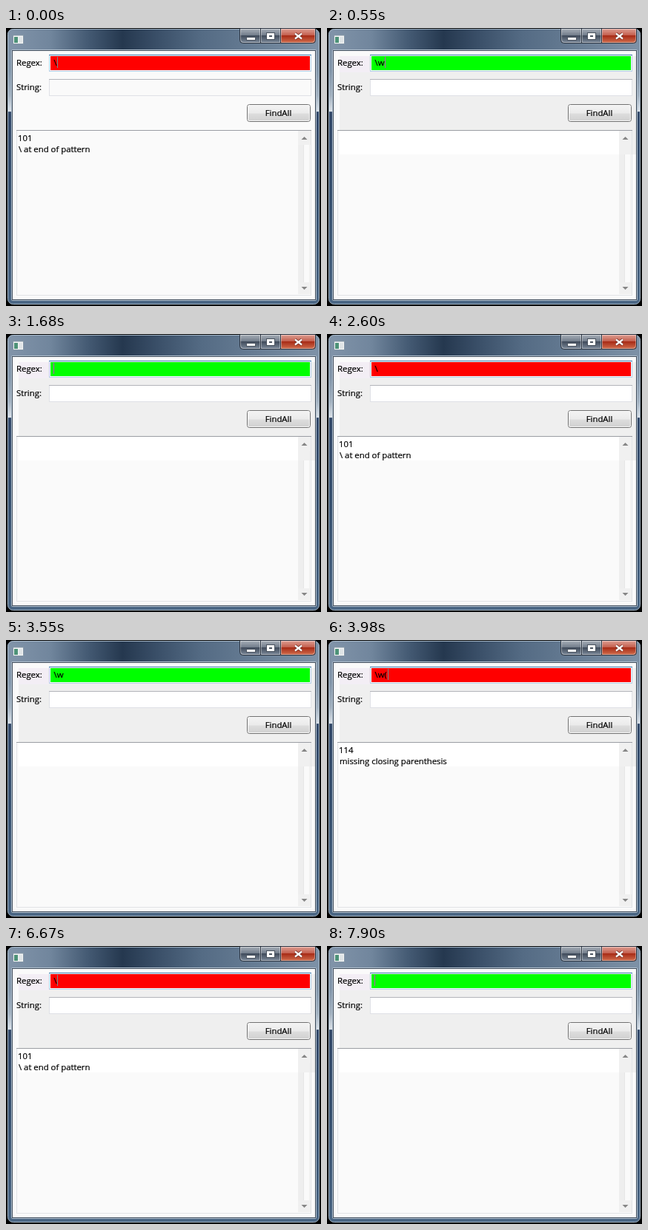
Write an HTML page with a canvas that moves like this. It is 425 px wide and 376 px high and loops after 8000 ms.

```html
<!DOCTYPE html>
<html lang="en">
<head>
<meta charset="utf-8">
<title>Regex tester</title>
<style>
html, body { margin: 0; width: 100%; height: 100%; overflow: hidden; background: #000; }
canvas, svg { position: absolute; left: 0; top: 0; width: 425px; height: 376px; }
text { font: 11.35px "Open Sans", "Noto Sans", sans-serif; fill: #000; stroke: #000; stroke-width: .22px; }
</style>
</head>
<body>
<canvas id="view" width="425" height="376"></canvas>
<svg viewBox="0 0 425 376">
  <text x="14" y="51">Regex:</text>
  <text x="14" y="84">String:</text>
  <text x="367.5" y="119" text-anchor="middle">FindAll</text>
  <text id="pattern" x="64.6" y="51"></text>
  <text id="code" x="16" y="153"></text>
  <text id="message" x="17" y="168"></text>
</svg>
<script>
const LOOP = 8000;
const ctx = document.getElementById('view').getContext('2d');
const [pattern, code, message] = ['pattern', 'code', 'message'].map(id => document.getElementById(id));

// start time, typed pattern, caret visible
const steps = [
  [0, '\\', 1], [430, '\\w', 0], [550, '\\w', 1], [1100, '\\w', 0],
  [1410, '\\', 1], [1680, '', 1], [2080, '\\', 1], [2600, '\\', 0],
  [3030, '\\w', 1], [3550, '\\w', 0], [3980, '\\w(', 1], [4410, '\\w(', 0],
  [4970, '\\w(', 1], [5560, '\\w(', 0], [5990, '\\w', 1], [6510, '\\w', 0],
  [6670, '\\', 1], [6790, '', 1], [7340, '', 0], [7900, '', 1]
];
const caretX = [64, 69, 78, 82];
const errors = {
  '\\': ['101', '\\ at end of pattern'],
  '\\w(': ['114', 'missing closing parenthesis']
};

function rect(x, y, w, h, fill) {
  ctx.fillStyle = fill;
  ctx.fillRect(x, y, w, h);
}

function addStops(gradient, stops) {
  stops.forEach(([at, color]) => gradient.addColorStop(at, color));
  return gradient;
}
const down = (y0, y1, ...stops) => addStops(ctx.createLinearGradient(0, y0, 0, y1), stops);
const across = (x0, x1, ...stops) => addStops(ctx.createLinearGradient(x0, 0, x1, 0), stops);

function rounded(x, y, w, h, r, fill, stroke) {
  ctx.beginPath();
  ctx.roundRect(x, y, w, h, r);
  if (fill) { ctx.fillStyle = fill; ctx.fill(); }
  if (stroke) { ctx.strokeStyle = stroke; ctx.lineWidth = 1; ctx.stroke(); }
}

function box(x, y, w, h, fill, top, side) {
  rect(x, y, w, h, side);
  rect(x + 1, y + 1, w - 2, h - 2, fill);
  rect(x, y, w, 1, top);
}

function arrow(x, y, dir) {
  ctx.fillStyle = '#858585';
  ctx.beginPath();
  ctx.moveTo(x - 4, y + 2 * dir);
  ctx.lineTo(x + 4, y + 2 * dir);
  ctx.lineTo(x, y - 2 * dir);
  ctx.fill();
}

function captionButton(x, w, radii, fill) {
  rounded(x + 0.5, 0.5, w, 20, radii, fill, '#2b3441');
  rounded(x + 1.5, 1.5, w - 2, 18, radii, null, 'rgba(255,255,255,.4)');
}

function drawCaption() {
  const steel = down(1, 20, [0, '#a9b0b9'], [0.45, '#737e8c'], [0.5, '#414c5c'], [1, '#7b8898']);
  const red = down(1, 20, [0, '#dfa094'], [0.45, '#c4604f'], [0.5, '#a82c17'], [1, '#cf6c4c']);
  captionButton(315, 28, [0, 0, 0, 4], steel);
  captionButton(343, 27, 0, steel);
  captionButton(370, 47, [0, 0, 4, 0], red);

  rect(324, 12, 13, 5, '#4c5561');
  rect(325, 13, 11, 3, '#fff');
  rect(351, 6, 12, 10, '#4c5561');
  rect(352, 7, 10, 8, '#fff');
  rect(355, 10, 4, 2, '#4c5561');

  for (const [color, width] of [['#6b2a22', 4], ['#fff', 2.3]]) {
    ctx.strokeStyle = color;
    ctx.lineWidth = width;
    ctx.beginPath();
    ctx.moveTo(390, 7.5); ctx.lineTo(399, 14.5);
    ctx.moveTo(399, 7.5); ctx.lineTo(390, 14.5);
    ctx.stroke();
  }

  rect(9, 9, 15, 13, '#8496a6');
  rect(10, 10, 13, 11, '#f4f6f6');
  rect(10, 10, 13, 1, '#c2cbd2');
  rect(11, 12, 5, 8, '#4d9278');
  rect(17, 12, 5, 8, '#dfe4e6');
}

function drawFrame() {
  rect(0, 0, 425, 376, '#000');
  rounded(2.5, 1.5, 420, 372, 7,
    down(2, 374, [0, '#7d90a5'], [0.15, '#8397ab'], [0.24, '#a3b2c1'],
      [0.298, '#dbe2e9'], [0.3, '#33496a'], [0.6, '#36506f'], [1, '#4a6684']));
  ctx.save();
  ctx.clip();
  rect(0, 0, 425, 30, across(0, 425, [0, '#8295aa'], [0.14, '#71869d'], [0.26, '#445a73'],
    [0.37, '#25384f'], [0.48, '#3a4f68'], [0.62, '#546b84'], [1, '#7f93a8']));
  ctx.restore();
  rounded(2.5, 1.5, 420, 372, 7, null, '#a9bac9');
  rounded(7.5, 29.5, 411, 339, 1, null, '#b4c3d1');
  rect(8, 30, 410, 338, '#3f4c5b');
  drawCaption();
}

function drawForm(first, color) {
  rect(9, 31, 408, 336, '#fafafa');
  if (!first) {
    rect(17, 38, 400, 133, '#efefef');
    rect(17, 38, 41, 22, '#f3eef5');
  }
  const paper = first ? '#fafafa' : '#fff';

  box(58, 36, 354, 23, '#f7fbfd', '#3d7bad', '#b5cfe7');
  rect(60, 38, 350, 19, color);
  box(58, 69, 354, 23, paper, '#b2b4ba', '#dfe1e6');

  rounded(325.5, 103.5, 85, 23, 3,
    down(104, 127, [0, '#f3f3f3'], [0.48, '#ebebeb'], [0.52, '#dddddd'], [1, '#cfcfcf']), '#707070');
  rounded(326.5, 104.5, 83, 21, 2, null, '#f8f8f8');

  box(14, 138, 398, 224, '#fafafa', '#9a9da3', '#e1e3e6');
  if (!first) rect(17, 139, 377, 32, '#fff');
  rect(394, 139, 8, 221, '#eeeeee');
  rect(401, 158, 1, 186, '#e6e6e6');
  rect(394, 139, 17, first ? 19 : 32, '#f0f0f0');
  rect(394, 344, 17, 16, '#f0f0f0');
  rect(409, 158, 1, 186, '#ededed');
  arrow(402.5, 149, 1);
  arrow(402.5, 352, -1);
}

function draw(index) {
  const [, typed, caret] = steps[index];
  const error = errors[typed];
  drawFrame();
  drawForm(index === 0, error ? '#ff0000' : '#00ff00');
  if (caret) rect(caretX[typed.length], 39, 1, 15, error ? '#6f9090' : '#c04cc0');
  pattern.textContent = typed;
  [code.textContent, message.textContent] = error || ['', ''];
}

const start = performance.now();
let shown = -1;

function tick() {
  const t = (performance.now() - start) % LOOP;
  const index = steps.findLastIndex(step => step[0] <= t);
  if (index !== shown) draw(shown = index);
  requestAnimationFrame(tick);
}
tick();
</script>
</body>
</html>
```
